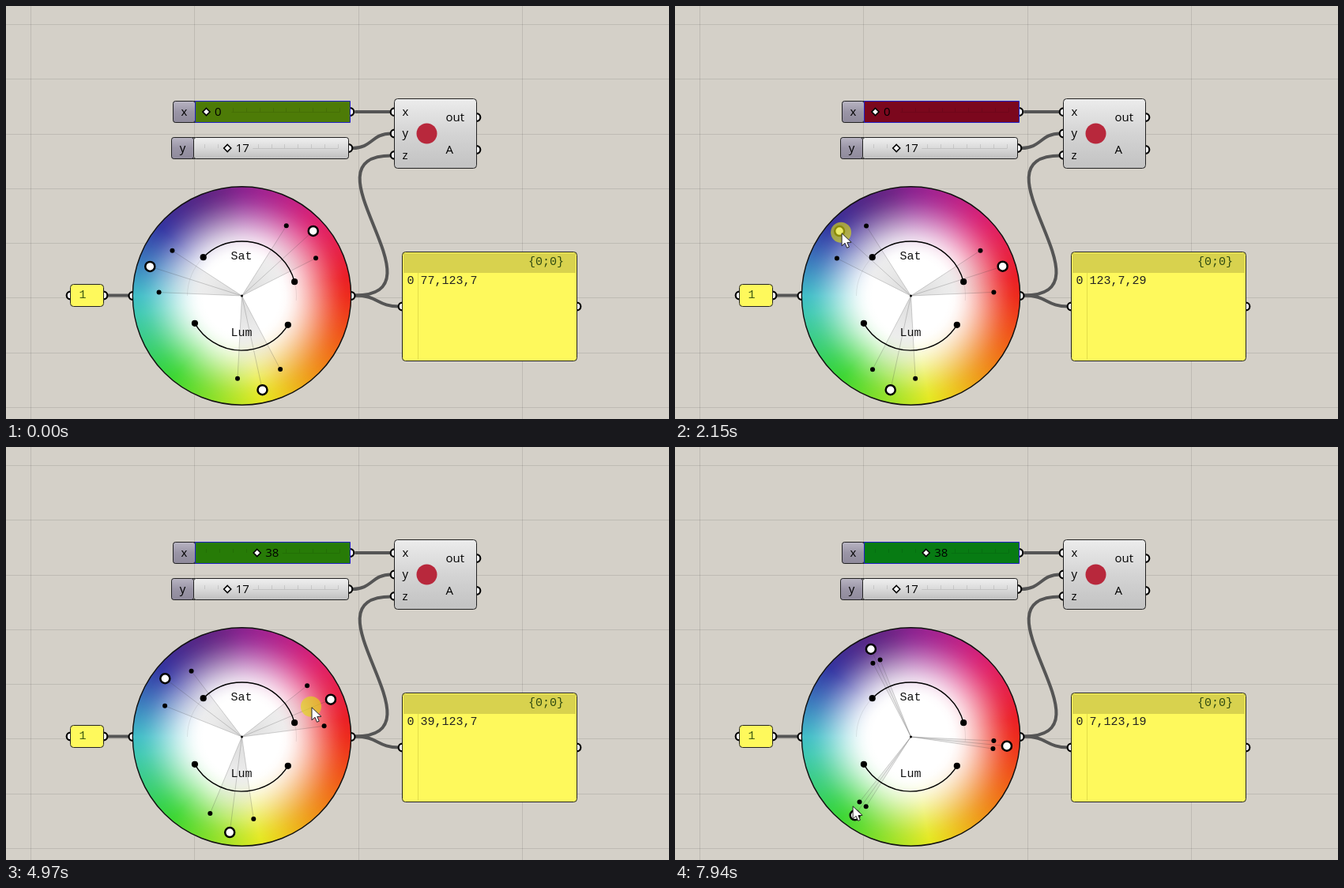
Write an HTML page with a canvas that moves like this. It is 839 px wide and 523 px high and loops after 8000 ms.

```html
<!DOCTYPE html>
<html lang="en">
<head>
<meta charset="utf-8">
<title>Colour wheel graph</title>
<style>
html, body { margin: 0; width: 100%; height: 100%; overflow: hidden; background: #d4d0c8; }
canvas { display: block; }
</style>
</head>
<body>
<canvas id="stage" width="839" height="523"></canvas>
<script>
const c = document.getElementById('stage').getContext('2d');
const LOOP = 8000, STEP = 78, TAU = Math.PI * 2;
const CX = 298.5, CY = 367, R = 138.2;
const SANS = '15px "Open Sans", "Noto Sans", sans-serif';
const MONO = '15px "Liberation Mono", monospace';

const rad = a => a * Math.PI / 180;
const polar = (a, r) => [CX + r * Math.cos(rad(a)), CY + r * Math.sin(rad(a))];
const clamp = v => Math.min(1, Math.max(0, v));
const ramp = (t, a, b) => clamp((t - a) / (b - a));
const ease = u => u * u * (3 - 2 * u);

// Wheel rotation, dragged dot and slider value over time
const turnAt = t => -42.3 - 14.5 * ramp(t, 886, 1380) - 81 * ramp(t, 1380, 1840)
  + 65.2 * ramp(t, 2160, 2550) + 49.8 * ramp(t, 4340, 4968) + 28.3 * ramp(t, 4968, 5150);
const dotAt = t => 110.2 + 35 * ramp(t, 6216, 6830) - 34 * ramp(t, 6980, 7300) + 17.05 * ramp(t, 7300, 7700);
const valueAt = t => 38 * ramp(t, 3480, 3880);

// While the button is down the pointer follows what it holds
const drags = [
  { from: 886, to: 2560, at: t => polar(turnAt(t), 110 + 8 * ramp(t, 1380, 1840)) },
  { from: 3310, to: 3900, at: t => [253 + valueAt(t) * 1.69, 147] },
  { from: 4340, to: 5180, at: t => polar(turnAt(t), 115 - 19 * ramp(t, 4340, 4968)) },
  { from: 5740, to: 7700, at: t => {
    const p = ramp(t, 6216, 7700);
    return polar(dotAt(t) + 1.6 * p, 109 + 5.5 * p);
  } }
];

function pointerAt(t) {
  const i = drags.findIndex(d => t < d.to);
  if (i < 0) return drags[drags.length - 1].at(t);
  const next = drags[i], prev = drags[i - 1];
  if (t >= next.from) return next.at(t);
  const start = prev ? prev.to : 70;
  const a = prev ? prev.at(start) : [634, 436], b = next.at(next.from);
  const u = ease(clamp(1.25 * ramp(t, start, next.from)));
  return a.map((v, j) => v + (b[j] - v) * u);
}

// Colour channels run from 7 to 123
function pick(hue) {
  return [0, 240, 120].map(off => {
    const h = ((hue + off) % 360 + 360) % 360;
    return Math.floor(7 + 116 * clamp(2 - Math.min(h, 360 - h) / 60));
  });
}

function gradY(y0, y1, ...stops) {
  const g = c.createLinearGradient(0, y0, 0, y1);
  stops.forEach((s, i) => g.addColorStop(i / (stops.length - 1), s));
  return g;
}

function disc(x, y, r, fill, stroke, width) {
  c.beginPath();
  c.arc(x, y, r, 0, TAU);
  c.fillStyle = fill;
  c.fill();
  if (stroke) {
    c.strokeStyle = stroke;
    c.lineWidth = width;
    c.stroke();
  }
}

function shape(points, x, y, stroke, width) {
  c.beginPath();
  points.forEach(([dx, dy]) => c.lineTo(x + dx, y + dy));
  c.closePath();
  c.fillStyle = '#fff';
  c.fill();
  c.strokeStyle = stroke;
  c.lineWidth = width;
  c.stroke();
}

function box(x, y, w, h, fill, radius = 3, stroke = '#222') {
  c.beginPath();
  c.roundRect(x, y, w, h, radius);
  c.fillStyle = fill;
  c.fill();
  c.strokeStyle = stroke;
  c.lineWidth = 1;
  c.stroke();
}

function ports(x, y, h, count) {
  for (let i = 0; i < count; i++)
    disc(x, y + 3 + (h - 6) * (i + .5) / count, 4.8, '#fff', '#000', 2.2);
}

// A box with its ports tucked behind the left and right edges
function node(x, y, w, h, fill, ins, outs) {
  ports(x, y, h, ins);
  ports(x + w, y, h, outs);
  box(x, y, w, h, fill, 4);
}

function text(s, x, y, font = SANS, color = '#000', align = 'left') {
  c.font = font;
  c.fillStyle = color;
  c.textAlign = align;
  c.fillText(s, x, y);
}

function wire(x0, y0, x1, y1, a, b) {
  c.strokeStyle = '#555';
  c.lineWidth = 4;
  c.beginPath();
  c.moveTo(x0, y0);
  c.bezierCurveTo(a, y0, b, y1, x1, y1);
  c.stroke();
}

function backdrop() {
  c.fillStyle = '#d4d0c8';
  c.fillRect(0, 0, 839, 523);
  c.fillStyle = 'rgba(0,0,0,.1)';
  for (let i = 0; i < 4; i++) c.fillRect(Math.round(31 + i * 207.4), 0, 1, 523);
  for (let i = 0; i < 8; i++) c.fillRect(0, Math.round(23 + i * 69.25), 839, 1);
}

function wires() {
  wire(442, 134.5, 488, 134.5, 460, 470);
  wire(439, 180.5, 488, 162, 464, 463);
  wire(442, 367, 488, 190, 561, 371);
  wire(442, 367, 498, 381, 472, 470);
  wire(128, 367, 156, 367, 138, 146);
}

function slider(x, y, label, end, value, fill) {
  const h = 27, left = x + 28, mid = y + h / 2, zero = left + 14, knob = zero + value * 1.69;
  node(x, y, end - x, h, '#ddd', 0, 1);
  box(x, y, 28, h, gradY(y, y + h, '#b9b5c3', '#9a95a6', '#8f8a9b'));
  box(left, y, end - left, h, fill || gradY(y, y + h, '#f0f0f0', '#dadada', '#bebebe'),
    fill ? 0 : 3, fill ? '#2020c8' : '#222');
  text(label, x + 14, y + 18, SANS, '#000', 'center');
  c.fillStyle = 'rgba(0,0,0,.1)';
  for (let i = 0; i <= 10; i++) {
    const tx = zero + i * 16.9;
    if (tx < knob - 5 || tx > knob + 30) c.fillRect(Math.round(tx) - .5, mid - 5, 1, 5);
  }
  c.fillRect(knob + 32, mid, zero + 169 - knob - 32, 1);
  shape([[0, -4.5], [4.5, 0], [0, 4.5], [-4.5, 0]], knob, mid, '#000', 1.6);
  text(Math.round(value), knob + 10.5, y + 18);
}

function component() {
  node(492, 118, 104, 88, gradY(118, 206, '#ececec', '#d4d4d4', '#c2c2c2'), 3, 2);
  ['x', 'y', 'z'].forEach((s, i) => text(s, 502, 139 + i * 27.7));
  ['out', 'A'].forEach((s, i) => text(s, 557, 146 + i * 41));
  disc(533, 162, 13, '#b8283c');
}

function panels(rgb) {
  node(82, 353, 42, 28, '#fef95c', 1, 1);
  text('1', 93, 370, MONO, '#3f5c14');
  node(502, 312, 221, 138, '#fef95c', 1, 1);
  c.fillStyle = '#d8d24e';
  c.fillRect(503.5, 313.5, 218, 25);
  c.fillStyle = 'rgba(120,110,0,.2)';
  c.fillRect(521.5, 338.5, 1, 110);
  text('{0;0}', 661.5, 328, MONO, '#2f4a10');
  text('0', 508, 352, MONO, '#222');
  text(rgb.join(), 525, 352, MONO, '#222');
}

const hues = c.createConicGradient(0, CX, CY);
for (let a = 0; a <= 360; a += 10) {
  const hue = a + 4 - 23 * Math.sin(rad(a));
  const sat = 70 + 18 * Math.cos(rad(a - 30));
  const light = 52 - 19 * Math.max(0, Math.cos(rad(a - 255))) ** 3;
  hues.addColorStop(a / 360, `hsl(${hue} ${sat}% ${light}%)`);
}
function radial(r, rgb, alpha) {
  const g = c.createRadialGradient(CX, CY, 0, CX, CY, r);
  for (let u = 0; u <= 20; u++) g.addColorStop(u / 20, `rgba(${rgb},${alpha(u / 20)})`);
  return g;
}
const whiten = radial(R, '255,255,255', u => 1 - ease(ramp(u, .35, 1)));
const wedge = radial(105, '0,0,0', u => .14 * (1 - u));

function arc(from, to, color, width) {
  c.beginPath();
  c.arc(CX, CY, 69, rad(from), rad(to));
  c.strokeStyle = color;
  c.lineWidth = width;
  c.stroke();
}

// Black arc with a round grip on both ends
function range(from, to, label, y) {
  arc(from, to, '#000', 1.4);
  [from, to].forEach(a => disc(...polar(a, 69), 4.1, '#000'));
  text(label, 298, y, MONO, '#111', 'center');
}

function wheel(turn, spread) {
  ports(CX - R, CY - R, R * 2, 1);
  ports(CX + R, CY - R, R * 2, 1);
  disc(CX, CY, R, hues);
  disc(CX, CY, R, whiten, '#111', 1.4);
  arc(180, 365, 'rgba(0,0,0,.08)', 1);
  const arms = [turn, turn + 120, turn + 240];
  for (const a of arms) {
    const spokes = [polar(a - spread, 105), polar(a, 122), polar(a + spread, 105)];
    c.beginPath();
    c.moveTo(CX, CY);
    c.lineTo(...spokes[0]);
    c.lineTo(...spokes[2]);
    c.fillStyle = wedge;
    c.fill();
    c.beginPath();
    for (const p of spokes) {
      c.moveTo(CX, CY);
      c.lineTo(...p);
    }
    c.strokeStyle = 'rgba(60,60,60,.23)';
    c.lineWidth = 1;
    c.stroke();
  }
  disc(CX, CY, 1.5, '#000');
  range(225, 345, 'Sat', 321);
  range(32.3, 149.7, 'Lum', 418);
  for (const a of arms) {
    disc(...polar(a, 122), 6, '#fff', '#000', 2.5);
    [-spread, spread].forEach(s => disc(...polar(a + s, 105), 3, '#000'));
  }
}

function pointer(t) {
  if (t < 50) return;
  const [x, y] = pointerAt(t);
  if (drags.some(d => t >= d.from && t < d.to)) disc(x - 1, y - 1, 13, 'rgba(222,222,14,.62)');
  shape([[0, 0], [0, 16], [4, 12.5], [6.5, 18.5], [9.3, 17.4], [6.8, 11.7], [12, 11.5]], x, y, '#222', 1);
}

function draw(now) {
  const t = Math.max(0, Math.floor((now % LOOP + 34) / STEP) * STEP - 24);
  const turn = turnAt(t), spread = Math.abs(125.5 - dotAt(t));
  const rgb = pick(turn + 120 + spread * .39);
  backdrop();
  c.save();
  c.translate(-.5, -.5);
  wires();
  slider(212, 121, 'x', 436, valueAt(t), `rgb(${rgb})`);
  slider(210, 167, 'y', 434, 17);
  component();
  panels(rgb);
  c.restore();
  wheel(turn, spread);
  pointer(t);
}

const start = performance.now();
function tick() {
  draw(performance.now() - start);
  requestAnimationFrame(tick);
}
tick();
</script>
</body>
</html>
```
